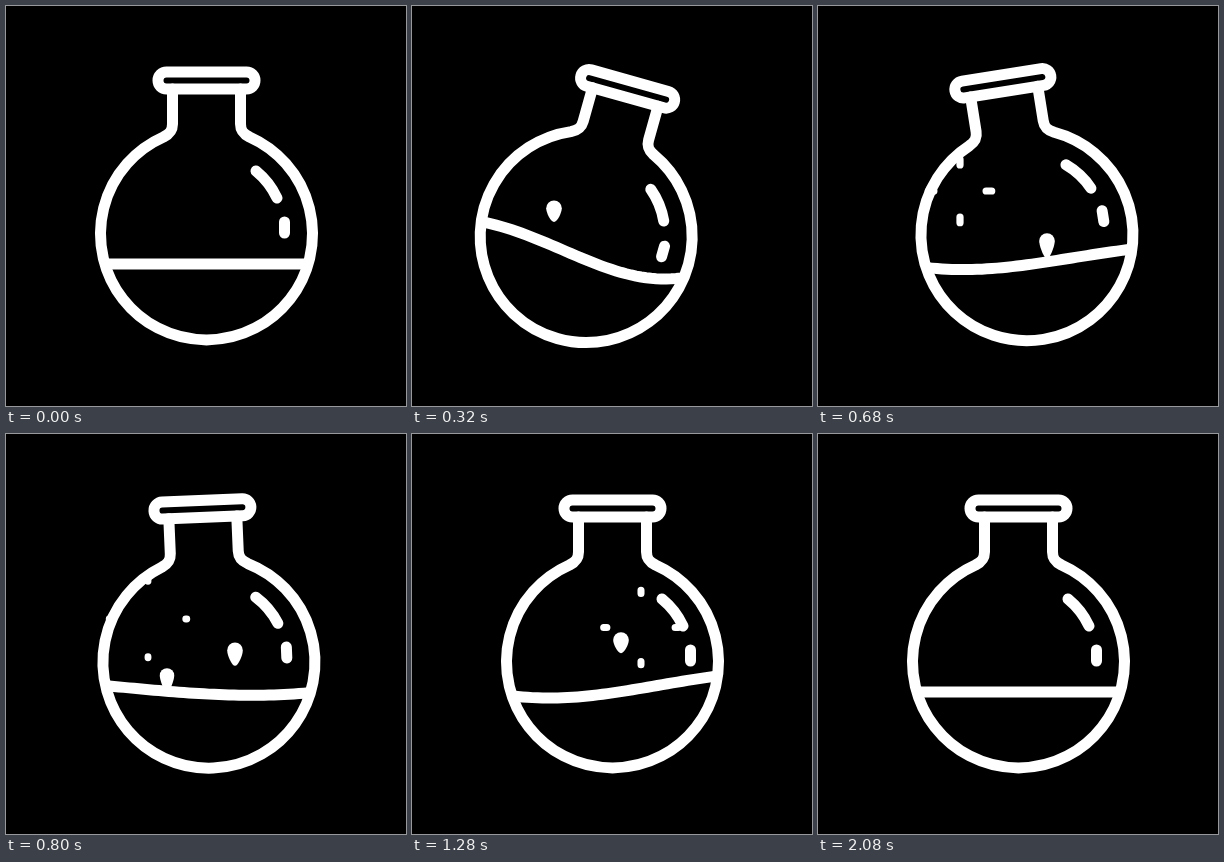
Recreate the animation shown at these times as an HTML page with a canvas. Size 400 by 400 pixels, loop 2.2 s.

```html
<!DOCTYPE html>
<html lang="en">
<head>
<meta charset="utf-8">
<title>Flask</title>
<style>
html, body { margin: 0; width: 100%; height: 100%; overflow: hidden; background: #000; }
canvas { display: block; width: 400px; height: 400px; }
</style>
</head>
<body>
<canvas id="stage" width="400" height="400"></canvas>
<script>
const g = document.getElementById('stage').getContext('2d');
const LOOP = 2200, STEP = 40, REST = 2080;
const CX = 200.5, CY = 228, R = 106, LEVEL = 258, LINE = 11;
const RISE = 460, POP = 540, BURST = 330, REACH = 39;

// Turning points as [time, value]; each swing starts and ends at zero
const TILT = [[270, 18.8], [520, -14], [930, 1], [1120, 0]];
const SHIFT = [[270, -30.5], [520, 13], [930, -0.7], [1120, 0]];
const SLOSH = [[300, 28], [560, -17], [850, 5], [1200, -16], [1490, 20], [1840, -4], [REST, 0]];

const BUBBLES = [
  { start: 46, x: 142, top: 185 },
  { start: 586, x: 229, top: 193.5 },
  { start: 750, x: 161, top: 185 },
  { start: 985, x: 209, top: 193.5 }
];

const BODY = new Path2D('M-34-145V-110C-34-103-37-100-43-97A106 106 0 1 0 43-97C37-100 34-103 34-110V-145');
const SHINE = new Path2D('M49.5-63Q63-52 70.5-36M78-12V-1');
const CAP = new Path2D('M-40-162H40a8.5 8.5 0 0 1 0 17H-40a8.5 8.5 0 0 1 0-17Z');

const easeOut = (u, power) => 1 - (1 - u) ** power;

function swing(points, t) {
  let from = 0, began = 0;
  for (const [end, to] of points) {
    if (t < end) {
      const u = (t - began) / (end - began);
      return from + (to - from) * (1 - Math.cos(Math.PI * u)) / 2;
    }
    [began, from] = [end, to];
  }
  return from;
}

function drawFlask(x, y, degrees) {
  g.save();
  g.translate(x, y);
  g.rotate(degrees * Math.PI / 180);
  g.lineWidth = LINE;
  for (const path of [BODY, CAP, SHINE]) g.stroke(path);
  g.restore();
}

function drawLiquid(x, y, t) {
  const wave = swing(SLOSH, t), tilt = Math.abs(wave), swell = Math.sin(Math.PI * t / REST);
  const middle = LEVEL + 3 * swell - 0.2 * tilt, bow = 4 * swell + 0.3 * tilt;
  g.save();
  g.beginPath();
  g.arc(x, y, R, 0, 7);
  g.clip();
  g.beginPath();
  for (let u = -1.1; u < 1.11; u += 0.05) {
    g.lineTo(x + u * 100, middle + wave * Math.sin(1.5 * u) - bow * u * u);
  }
  g.lineWidth = LINE;
  g.stroke();
  g.restore();
}

// A bubble with a tail that shortens as it rises
function drawDrop(x, top, age) {
  const u = age / RISE, size = Math.min(1, 0.3 + age / 80);
  const r = 7.8 * size, tail = Math.max(r, (18 - 12 * u * u) * size);
  const y = 252 + (top - 252) * easeOut(u, 1.5);
  g.beginPath();
  g.arc(x, y, r, Math.PI, 0);
  g.bezierCurveTo(x + r, y + r * 0.6, x + r * 0.4, y + tail, x, y + tail);
  g.bezierCurveTo(x - r * 0.4, y + tail, x - r, y + r * 0.6, x - r, y);
  g.fill();
}

// Four dashes fly apart, their tails catching up into dots
function drawBurst(x, y, u) {
  const tip = REACH * easeOut(u, 5), tail = REACH * easeOut(u, 3.3);
  g.lineWidth = 7.5 - u;
  g.beginPath();
  for (const [dx, dy] of [[1, 0], [-1, 0], [0, 1], [0, -1]]) {
    g.moveTo(x + dx * tail, y + dy * tail);
    g.lineTo(x + dx * (tip + 0.01), y + dy * (tip + 0.01));
  }
  g.stroke();
}

function draw(t) {
  g.fillStyle = '#000';
  g.fillRect(0, 0, 400, 400);
  g.fillStyle = g.strokeStyle = '#fff';
  g.lineCap = g.lineJoin = 'round';
  const shift = swing(SHIFT, t), x = CX + shift, y = CY + Math.abs(shift) / 10;
  drawLiquid(x, y, t);
  drawFlask(x, y, swing(TILT, t));
  for (const { start, x, top } of BUBBLES) {
    const age = t - start, u = (age - POP) / BURST;
    if (age >= 0 && age < RISE) drawDrop(x, top, age);
    if (u >= 0 && u < 1) drawBurst(x, top, u);
  }
}

const began = performance.now();
function tick() {
  const t = (performance.now() - began) % LOOP;
  draw(Math.min(REST, Math.floor(t / STEP) * STEP));
  requestAnimationFrame(tick);
}
tick();
</script>
</body>
</html>
```
